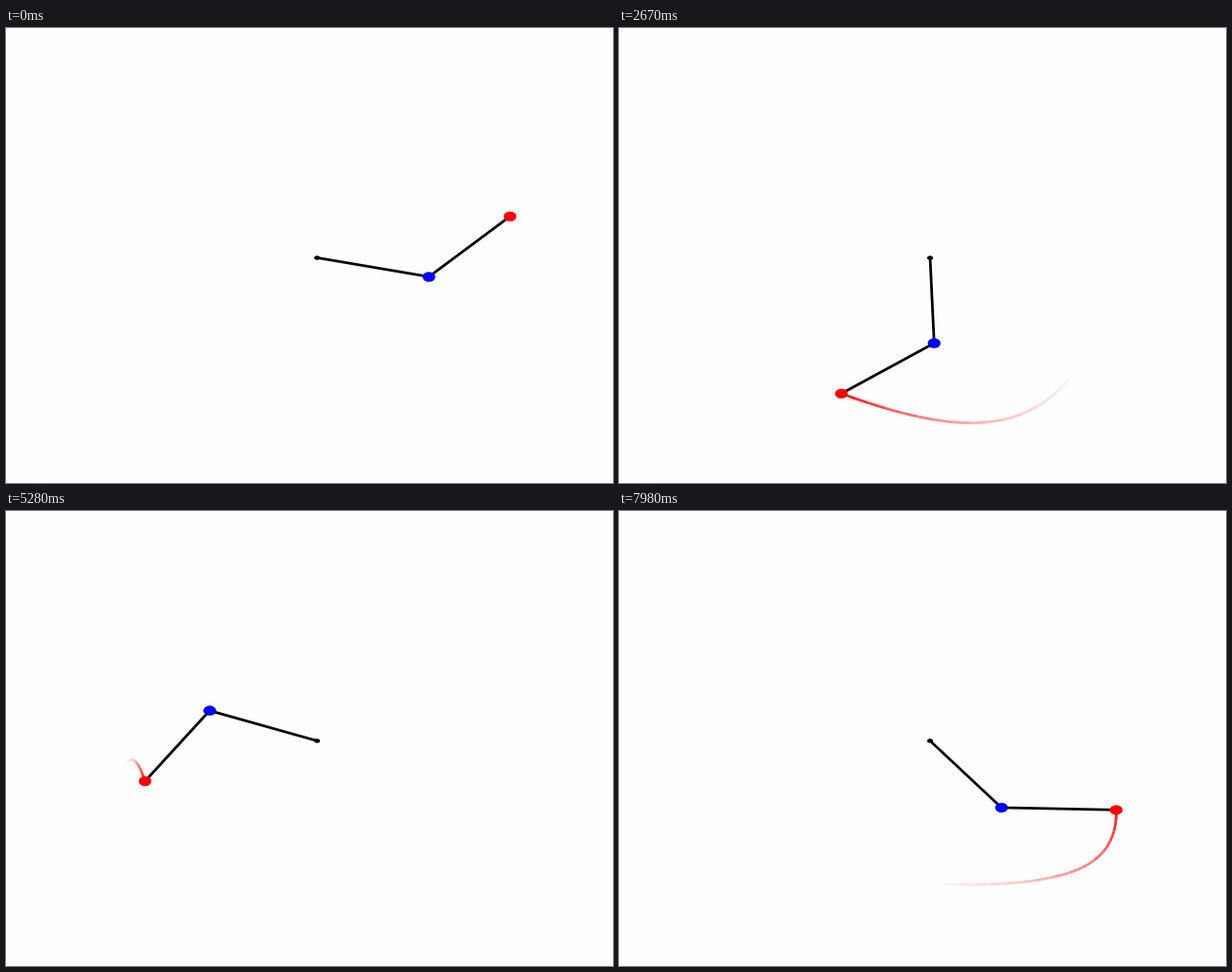
An HTML page with a canvas for the animation above (8000 ms loop, 640 by 480 pixels).

```html
<!DOCTYPE html>
<html lang="en">
<head>
<meta charset="utf-8">
<title>Double pendulum</title>
<style>
  html, body { margin: 0; width: 100%; height: 100%; overflow: hidden; background: #fefefe; }
  canvas { display: block; width: 640px; height: 480px; }
</style>
</head>
<body>
<canvas id="stage" width="640" height="480"></canvas>
<script>
const ctx = document.getElementById('stage').getContext('2d');

const LOOP = 8000, FRAME = 30, FRAMES = 267;
const G = 9.81, DT = 0.01, SUBSTEPS = 10;
const CENTER = { x: 328, y: 242.4 };
const SCALE = { x: 496 / 4.1, y: 369.6 / 4.1 };
const ROD_WIDTH = 2.78, EDGE = 1.39 / 2, RADIUS = 0.05;
const SEGMENTS = 20, SEGMENT_STEPS = 2, FIRST_VISIBLE = 5;

// State: [angle1, speed1, angle2, speed2], unit lengths and masses.
function derive([a, u, b, v]) {
  const c = Math.cos(a - b), s = Math.sin(a - b), d = 1 + s * s;
  return [
    u,
    (G * Math.sin(b) * c - s * (u * u * c + v * v) - 2 * G * Math.sin(a)) / d,
    v,
    (2 * (u * u * s - G * Math.sin(b) + G * Math.sin(a) * c) + v * v * s * c) / d
  ];
}

function rungeKutta(state, h) {
  const shift = (k, f) => state.map((q, n) => q + k[n] * f);
  const k1 = derive(state);
  const k2 = derive(shift(k1, h / 2));
  const k3 = derive(shift(k2, h / 2));
  const k4 = derive(shift(k3, h));
  return state.map((q, n) => q + h / 6 * (k1[n] + 2 * k2[n] + 2 * k3[n] + k4[n]));
}

const swing = (from, angle) => ({
  x: from.x + SCALE.x * Math.sin(angle),
  y: from.y + SCALE.y * Math.cos(angle)
});

function simulate() {
  const poses = [];
  let state = [3 * Math.PI / 7, 0, 3 * Math.PI / 4, 0];
  for (let i = 0; i < FRAMES; i++) {
    const inner = swing(CENTER, state[0]);
    poses.push({ inner, outer: swing(inner, state[2]) });
    for (let n = 0; n < SUBSTEPS; n++) state = rungeKutta(state, DT / SUBSTEPS);
  }
  return poses;
}

const poses = simulate();

function polyline(points, color, cap) {
  ctx.beginPath();
  points.forEach(p => ctx.lineTo(p.x, p.y));
  ctx.strokeStyle = color;
  ctx.lineCap = cap;
  ctx.stroke();
}

function disc(p, radius, edge, color) {
  ctx.beginPath();
  ctx.ellipse(p.x, p.y, radius * SCALE.x + edge, radius * SCALE.y + edge, 0, 0, 2 * Math.PI);
  ctx.fillStyle = color;
  ctx.fill();
}

function drawTrail(index) {
  for (let j = FIRST_VISIBLE; j < SEGMENTS; j++) {
    const start = index - (SEGMENTS - j) * SEGMENT_STEPS;
    if (start < 0) continue;
    const points = poses.slice(start, start + SEGMENT_STEPS + 1).map(p => p.outer);
    polyline(points, `rgba(255, 0, 0, ${(j / SEGMENTS) ** 2})`, 'butt');
  }
}

function draw(index) {
  const { inner, outer } = poses[index];
  ctx.fillStyle = '#fefefe';
  ctx.fillRect(0, 0, 640, 480);
  ctx.lineWidth = ROD_WIDTH;
  ctx.lineJoin = 'round';
  polyline([CENTER, inner, outer], '#000', 'square');
  drawTrail(index);
  disc(CENTER, RADIUS / 2, 0, '#000');
  disc(inner, RADIUS, EDGE, '#00f');
  disc(outer, RADIUS, EDGE, '#f00');
}

const begin = performance.now();
function tick() {
  const time = Math.max(0, performance.now() - begin) % LOOP;
  draw(Math.min(FRAMES - 1, Math.floor(time / FRAME)));
  requestAnimationFrame(tick);
}
tick();
</script>
</body>
</html>
```
